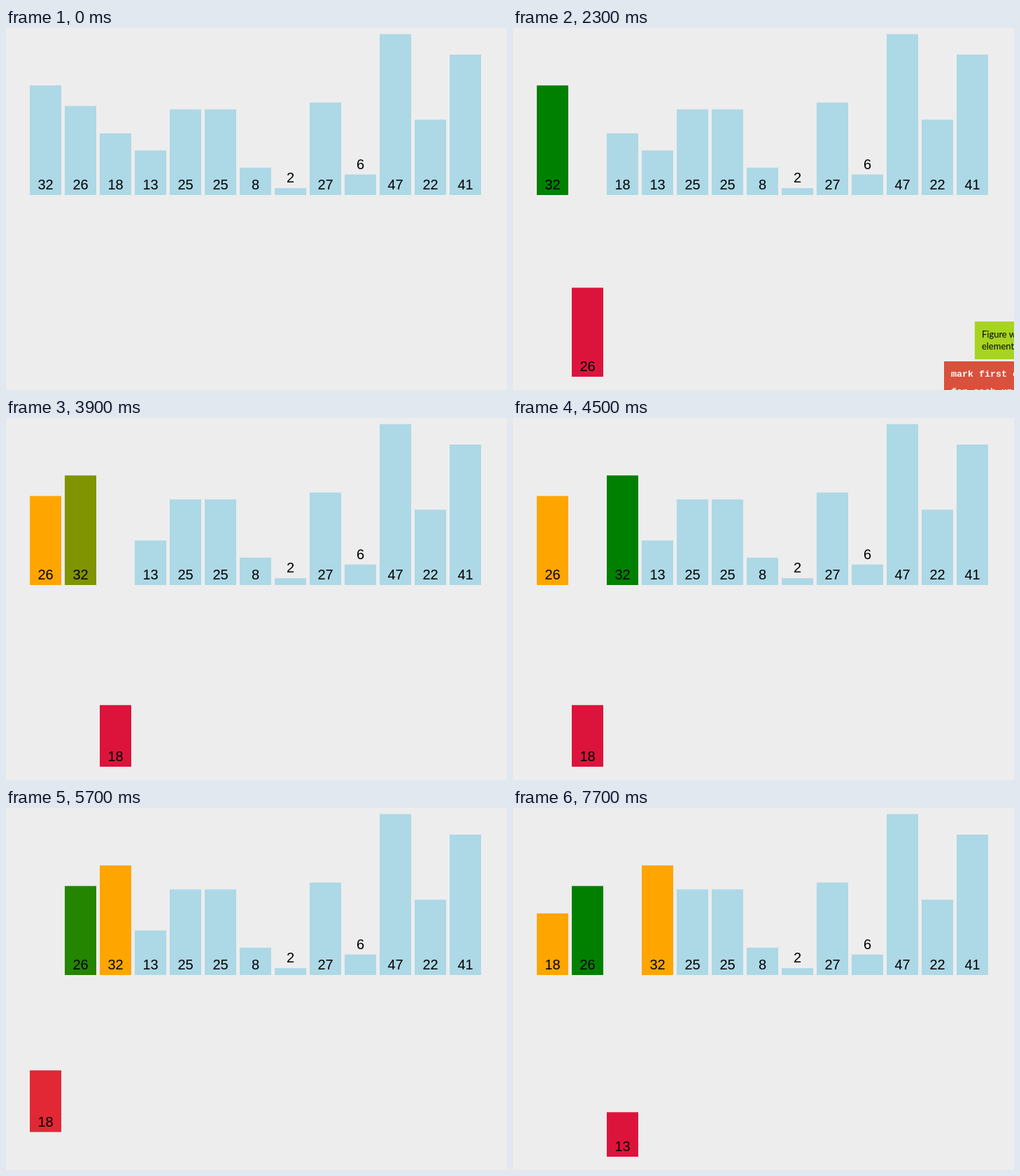
An HTML page that plays this animation: 716x518 px, repeating every 8000 ms.

```html
<!DOCTYPE html>
<html lang="en">
<head>
<meta charset="utf-8">
<title>Insertion sort</title>
<style>
  html, body { margin: 0; width: 100%; height: 100%; overflow: hidden; background: #ededed; }
  #stage { position: relative; width: 716px; height: 518px; overflow: hidden; }
  svg { position: absolute; left: 0; top: 0; }
  svg text { font: 20px "Liberation Sans", Arial, sans-serif; text-anchor: middle; }
  .panel { position: absolute; left: 616px; width: 300px; box-sizing: border-box; }
  #status {
    top: 420px; height: 54px; padding: 10px; background: #a7d41e;
    font: 13px/17px Lato, "Open Sans", sans-serif; white-space: pre;
  }
  #code {
    top: 477px; height: 180px; background: #d9513c; color: #fff;
    font: bold 13.33px/25px "Liberation Mono", monospace; white-space: pre;
  }
  #code div { padding-left: 10px; }
  #code div:first-child { padding-top: 6px; }
  #code .on { background: #000; }
</style>
</head>
<body>
<div id="stage">
  <svg id="chart" width="716" height="518"></svg>
  <div id="status" class="panel"></div>
  <div id="code" class="panel"><div>mark first element as sorted</div><div>for each unsorted element X</div></div>
</div>
<script>
const LOOP = 8000, TICK = 100, MOVE = 250, SLIDE = 400;
const BASE = 239, DROP = 260, UNIT = 4.9, PANEL = 300;
const BLUE = [173, 216, 230], ORANGE = [255, 165, 0], GREEN = [0, 128, 0], RED = [220, 20, 60];
const values = [32, 26, 18, 13, 25, 25, 8, 2, 27, 6, 47, 22, 41];

const sorted = { color: ORANGE }, compared = { color: GREEN };
const extracted = { color: RED, y: DROP }, inserted = { color: ORANGE, y: 0 };
const slot = n => ({ x: n * 50 });

// Start time, then the new properties of each bar by its first index
const steps = [
  [1057, { 0: sorted }],
  [1513, { 1: extracted }],
  [1969, { 0: compared }],
  [2425, { 0: slot(1), 1: slot(0) }],
  [2881, { 0: sorted, 1: inserted }],
  [3337, { 2: extracted }],
  [3775, { 0: compared }],
  [4250, { 0: slot(2), 2: slot(1) }],
  [4706, { 0: sorted, 1: compared }],
  [5163, { 1: slot(1), 2: slot(0) }],
  [5619, { 1: sorted, 2: inserted }],
  [6088, { 3: extracted }],
  [6532, { 0: compared }],
  [7002, { 0: slot(3), 3: slot(2) }],
  [7475, { 0: sorted, 1: compared }]
];

const messages = [
  [1969, "Figure where to insert extracted\nelement; comparing with 32."],
  [1513, "Extract the first unsorted element (26)."],
  [1057, "Mark the first element (32) as sorted."],
  [0, ""]
];

const clamp = v => Math.min(1, Math.max(0, v));
const mix = (a, b, k) => a + (b - a) * k;
const cubic = p => p < 0.5 ? 4 * p ** 3 : 1 - 4 * (1 - p) ** 3;
const swing = p => 0.5 - Math.cos(Math.PI * p) / 2;
const byId = id => document.getElementById(id);
const status = byId("status"), code = byId("code"), lines = code.children;

function add(parent, tag, attrs) {
  const node = document.createElementNS("http://www.w3.org/2000/svg", tag);
  for (const key in attrs) node.setAttribute(key, attrs[key]);
  return parent.appendChild(node);
}

const bars = values.map(value => {
  const height = value * UNIT, top = BASE - height;
  const group = add(byId("chart"), "g", {});
  const rect = add(group, "rect", { x: 34, y: top, width: 45, height });
  add(group, "text", { x: 56.5, y: height < 35 ? top - 8 : 231 }).textContent = value;
  return { group, rect };
});

function poseAt(index, time) {
  const pose = { x: index * 50, y: 0, color: BLUE };
  for (const [start, changes] of steps) {
    const goal = changes[index];
    if (!goal || time <= start) continue;
    const k = cubic(clamp((time - start) / MOVE));
    for (const key in goal) {
      pose[key] = key === "color"
        ? pose.color.map((c, i) => mix(c, goal.color[i], k))
        : mix(pose[key], goal[key], k);
    }
  }
  return pose;
}

function slide(panel, time, hideAt) {
  const eased = start => swing(clamp((time - start) / SLIDE));
  const offset = PANEL * (1 - eased(200) + eased(hideAt));
  panel.style.transform = `translateX(${offset}px)`;
}

function render(time) {
  bars.forEach(({ group, rect }, i) => {
    const { x, y, color } = poseAt(i, time);
    group.setAttribute("transform", `translate(${x} ${y})`);
    rect.setAttribute("fill", `rgb(${color.map(Math.round)})`);
  });
  slide(status, time, 2200);
  slide(code, time, 2800);
  status.textContent = messages.find(([start]) => time >= start)[1];
  lines[0].classList.toggle("on", time >= 1057 && time < 1513);
  lines[1].classList.toggle("on", time >= 1513 && time < 1969);
}

const begin = performance.now();
function frame() {
  const time = (performance.now() - begin) % LOOP;
  render(Math.floor(time / TICK) * TICK);
  requestAnimationFrame(frame);
}
frame();
</script>
</body>
</html>
```
